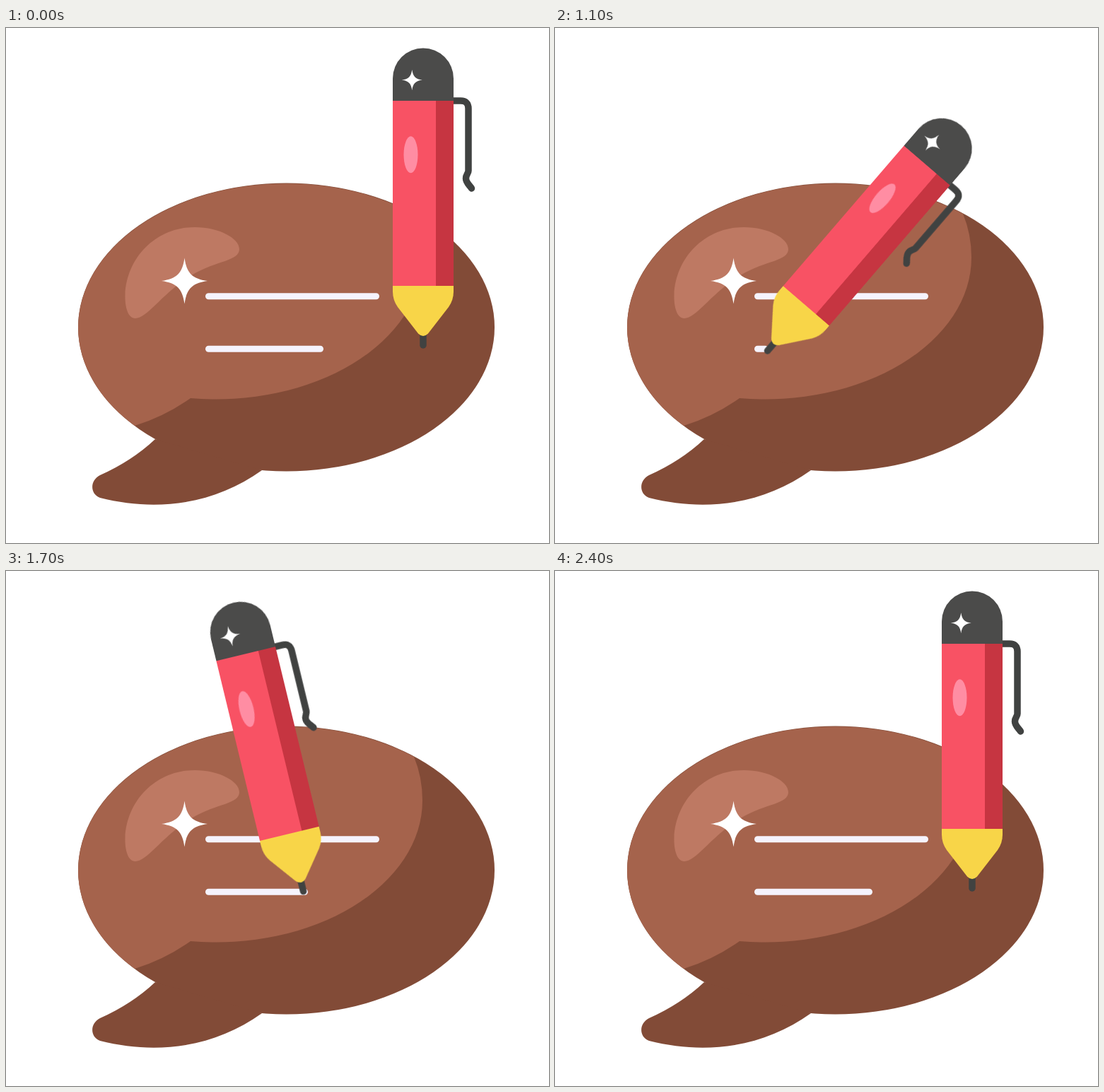
Animation of 768x729 px, one loop 2.7 s. Source, as an HTML page without scripts:

```html
<!DOCTYPE html>
<html lang="en">
<head>
<meta charset="utf-8">
<title>Writing a message</title>
<style>
  html, body { margin: 0; width: 100%; height: 100%; overflow: hidden; background: #fff; }
  svg { display: block; width: 100%; height: 100%; }

  .line, .wire { fill: none; stroke-linecap: round; }
  .line { stroke: #f5f3fd; stroke-width: 9; }
  .wire { stroke: #404241; stroke-width: 9.5; }

  /* Both parts move in 100 ms ticks of a 2.7 s loop */
  .pen, .written { animation: 2.7s step-end infinite; }
  .pen { animation-name: write; transform-origin: 0 0; transform-box: view-box; }
  .written { animation-name: trim; stroke-dasharray: 158 400; }

  @keyframes write {
    0%, 100% { transform: translate(590px, 449px) rotate(0deg); }
    /* swing to the left end of the line */
    14.81% { transform: translate(560px, 449.8px) rotate(4.5deg); }
    18.51% { transform: translate(476px, 452.2px) rotate(17.3deg); }
    22.22% { transform: translate(380.4px, 454.8px) rotate(31.7deg); }
    25.92% { transform: translate(304.8px, 456.9px) rotate(43.1deg); }
    29.62% { transform: translate(289.8px, 457.3px) rotate(45.4deg); }
    /* write up to the upright pose */
    40.74% { transform: translate(300.5px, 457px) rotate(40.7deg); }
    44.44% { transform: translate(324.5px, 456.3px) rotate(30.3deg); }
    48.14% { transform: translate(353.6px, 455.3px) rotate(17.7deg); }
    51.85% { transform: translate(380px, 454.7px) rotate(6.1deg); }
    55.55% { transform: translate(393.5px, 454.3px) rotate(.2deg); }
    59.25% { transform: translate(394px, 454.3px) rotate(0deg); }
    /* finish the line */
    62.96% { transform: translate(420.6px, 453.5px) rotate(-13.6deg); }
    66.66% { transform: translate(439.2px, 453.2px) rotate(-23.1deg); }
    /* return home */
    74.07% { transform: translate(471px, 452.4px) rotate(-18.2deg); }
    77.77% { transform: translate(514.6px, 451.1px) rotate(-11.5deg); }
    81.48% { transform: translate(559.8px, 449.8px) rotate(-4.6deg); }
    85.18% { transform: translate(587.7px, 449.1px) rotate(-.3deg); }
    88.88% { transform: translate(590px, 449px) rotate(0deg); }
  }

  /* Negative offsets erase from the left, positive ones draw from the left */
  @keyframes trim {
    0%, 100% { stroke-dashoffset: 0; }
    14.81% { stroke-dashoffset: -15.8; }
    18.51% { stroke-dashoffset: -60; }
    22.22% { stroke-dashoffset: -110.4; }
    25.92% { stroke-dashoffset: -150; }
    29.62% { stroke-dashoffset: -170; }
    40.74% { stroke-dashoffset: 147.2; }
    44.44% { stroke-dashoffset: 122.9; }
    48.14% { stroke-dashoffset: 93.5; }
    51.85% { stroke-dashoffset: 66.6; }
    55.55% { stroke-dashoffset: 53; }
    59.25% { stroke-dashoffset: 52.5; }
    62.96% { stroke-dashoffset: 22; }
    66.66% { stroke-dashoffset: 0; }
  }
</style>
</head>
<body>
<svg viewBox="0 0 768 729">
  <defs>
    <path id="star" fill="#fff" d="M0-32.5C3-11 11-3 32.5 0C11 3 3 11 0 32.5C-3 11-11 3-32.5 0C-11-3-3-11 0-32.5Z"/>
  </defs>

  <g fill="#824b37">
    <ellipse cx="396.5" cy="423.5" rx="294.5" ry="204"/>
    <path d="M211 582Q178 613 133 633C119 640 118 659 133 665C212 685 294 675 362 626Z"/>
  </g>
  <path fill="#a5634c" d="M182 563Q224 550 261 524A292 200.7 0 0 0 589 325Q589 292 577 263A294.5 204 0 0 0 102 423.5A294.5 204 0 0 0 182 563Z"/>
  <path fill="#be7963" d="M183 411C172 411 168 394 168.5 377C171 325 212 282 267 282C302 282 330 298 330 313C330 330 298 329 264 349C222 374 200 411 183 411Z"/>
  <use href="#star" x="252.5" y="358"/>

  <path class="line" d="M286.5 379.7H523.5"/>
  <path class="line written" d="M286.5 454.3H444.5"/>

  <g class="pen">
    <g transform="translate(-590 -449)">
      <path class="wire" d="M628 103H643Q654 103 654 114V202C654 206 650.5 207 650.5 213C650.5 219 656 223 658.5 227"/>
      <path class="wire" d="M590 430V449"/>
      <path fill="#f8d548" d="M547 364H633V373Q633 385 626 395L597 432.5Q590 439.5 583 432.5L554 395Q547 385 547 373Z"/>
      <path fill="#f85264" d="M547 102H633V365H547Z"/>
      <path fill="#c63541" d="M608 102H633V365H608Z"/>
      <path fill="#4b4b4a" d="M547 103V71.5A43 43 0 0 1 633 71.5V103Z"/>
      <ellipse cx="572.5" cy="179.3" rx="10" ry="26" fill="#ff8da3"/>
      <use href="#star" transform="translate(574.3 73.5) scale(.45)"/>
    </g>
  </g>
</svg>
</body>
</html>
```
